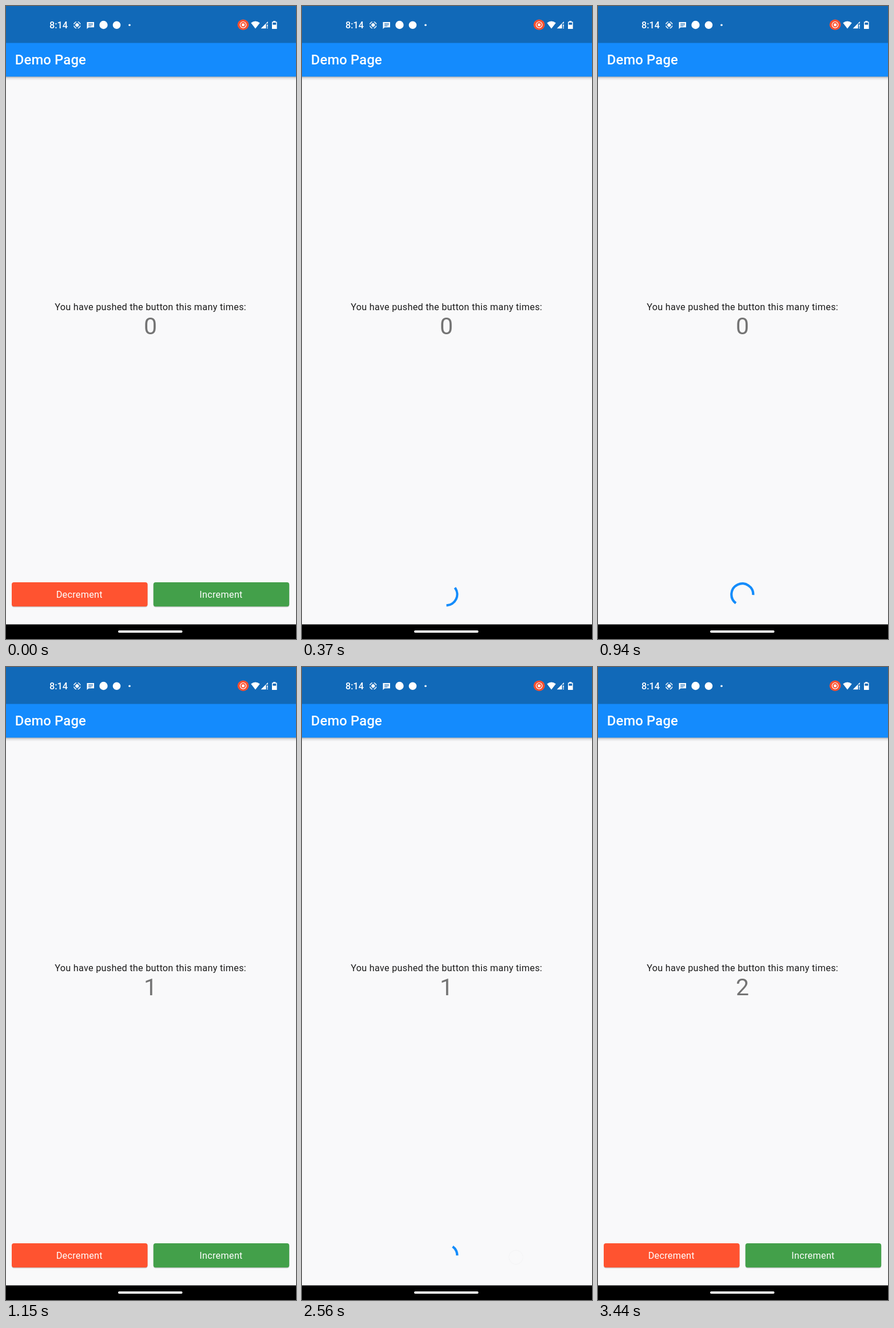
Animation, 507 px wide and 1105 px high, one loop 3480 ms. Source, as an HTML page:

```html
<!DOCTYPE html>
<html lang="en">
<head>
<meta charset="utf-8">
<title>Counter demo</title>
<style>
  html, body { margin: 0; width: 100%; height: 100%; overflow: hidden; background: #f9f9fa; }
  svg { display: block; width: 100%; height: 100%; font-family: Roboto, sans-serif; }
  .body { font-size: 16.25px; letter-spacing: .264px; text-anchor: middle; }
</style>
</head>
<body>
<svg viewBox="0 0 507 1105">
  <defs>
    <linearGradient id="shade" x2="0" y2="1">
      <stop offset="0" stop-color="#000" stop-opacity=".32"/>
      <stop offset=".4" stop-color="#000" stop-opacity=".1"/>
      <stop offset="1" stop-color="#000" stop-opacity="0"/>
    </linearGradient>
    <radialGradient id="touchFill">
      <stop offset="0" stop-color="#fff" stop-opacity=".72"/>
      <stop offset=".78" stop-color="#fff" stop-opacity=".6"/>
      <stop offset=".86" stop-color="#ddd" stop-opacity=".4"/>
      <stop offset=".9" stop-color="#000" stop-opacity=".14"/>
      <stop offset="1" stop-color="#000" stop-opacity="0"/>
    </radialGradient>
  </defs>

  <rect width="507" height="1105" fill="#f9f9fa"/>
  <rect y="123" width="507" height="7" fill="url(#shade)"/>
  <rect width="507" height="65" fill="#1169b8"/>
  <rect y="64.5" width="507" height="58.8" fill="#148bfd"/>
  <text x="15.8" y="101.5" font-size="23.8" font-weight="500" letter-spacing=".16" fill="#fff">Demo Page</text>

  <!-- status bar -->
  <g fill="#fff">
    <text x="76" y="39" font-size="16.2" font-weight="500">8:14</text>
    <circle cx="124.3" cy="33.2" r="3.1"/>
    <circle cx="124.3" cy="33.2" r="5.7" fill="none" stroke="#fff" stroke-width="1.4"
            pathLength="40" stroke-dasharray="7 3" stroke-dashoffset="-1.5"/>
    <path d="M141.5 28H154V37.3H144.5L141.5 40Z"/>
    <path d="M144 30.7H152M144 32.8H152M144 34.9H149.5" stroke="#1169b8" stroke-width="1"/>
    <circle cx="170.5" cy="33" r="7.2"/>
    <circle cx="193.5" cy="33.2" r="6.8"/>
    <circle cx="216" cy="33.3" r="1.8"/>
    <ellipse cx="414.6" cy="32.8" rx="9.9" ry="9.2" fill="#f9502f"/>
    <circle cx="414.6" cy="32.8" r="5.3" fill="none" stroke="#fff" stroke-width="1.2"/>
    <rect x="412.2" y="30.4" width="4.8" height="4.8" rx="1.4"/>
    <path d="M428.3 29.6Q436 23.6 443.8 29.6L436 39.4Z"/>
    <path d="M445.6 39.2L457.8 27V30.6H454.6V39.2Z"/>
    <path d="M456.2 32.3H457.8V36.5H456.2ZM456.2 37.6H457.8V39.2H456.2Z"/>
    <path d="M467.3 26H471.2V27.4H473.6V40H465V27.4H467.3Z"/>
    <rect x="466.4" y="29" width="5.8" height="3.7" fill="#1169b8"/>
  </g>

  <text class="body" x="252.6" y="530.5" fill="#1c1c1c">You have pushed the button this many times:</text>
  <text id="count" x="252.6" y="572.6" font-size="41" text-anchor="middle" fill="#747474">0</text>

  <g id="buttons"></g>
  <path id="spinner" fill="none" stroke="#148cfb" stroke-width="4.2"/>
  <circle id="touch" r="13.5" fill="url(#touchFill)"/>

  <rect y="1079.5" width="507" height="26" fill="#000"/>
  <rect x="196" y="1090" width="112.5" height="4" rx="2" fill="#fff"/>
</svg>
<script>
  const LOOP = 3480, TOUCH_FADE = 200;
  const PRESSES = [
    { x: 372, down: 30, up: 120, load: 145, done: 1110 },
    { x: 374, down: 2290, up: 2385, load: 2405, done: 3370 }
  ];
  const el = id => document.getElementById(id);
  const clamp = v => Math.min(1, Math.max(0, v));

  const button = (x, color, label) => `
    <rect x="${x}" y="1007" width="237.5" height="42.4" rx="4" fill="#000" opacity=".2"/>
    <rect x="${x}" y="1006" width="237.5" height="42.2" rx="4" fill="${color}"/>
    <text class="body" x="${x + 118.3}" y="1033" fill="#fff">${label}</text>`;
  el('buttons').innerHTML =
    button(10, '#ff5330', 'Decrement') + button(257.7, '#43a04a', 'Increment');

  // cubic-bezier(.4, 0, .2, 1), solved by bisection
  function ease(x) {
    let lo = 0, hi = 1;
    for (let i = 0; i < 24; i++) {
      const s = (lo + hi) / 2, r = 1 - s;
      if (1.2 * r * r * s + 0.6 * r * s * s + s * s * s < x) lo = s; else hi = s;
    }
    return lo * lo * (3 - 2 * lo);
  }

  // Material spinner: the head runs ahead, then the tail catches up, while all of it turns.
  function spinnerPath(ms) {
    const phase = ms / 1333 % 1;
    const head = ease(clamp(phase * 2)), tail = ease(clamp(phase * 2 - 1));
    const start = Math.PI * (-0.5 + 1.5 * tail + 2 * ms / 2222 + 0.5 * phase);
    const sweep = Math.max(1.5 * Math.PI * (head - tail), 0.001);
    const point = a => `${252.3 + 19 * Math.cos(a)} ${1027.2 + 19 * Math.sin(a)}`;
    return `M${point(start)}A19 19 0 ${sweep > Math.PI ? 1 : 0} 1 ${point(start + sweep)}`;
  }

  function render(t) {
    const loading = PRESSES.find(p => t >= p.load && t < p.done);
    el('buttons').style.display = loading ? 'none' : '';
    el('spinner').setAttribute('d', loading ? spinnerPath(t - loading.load) : '');
    el('count').textContent = PRESSES.filter(p => t >= p.done).length;

    const press = PRESSES.find(p => t >= p.down && t < p.up + TOUCH_FADE);
    const touch = el('touch');
    touch.style.display = press ? '' : 'none';
    if (press) {
      touch.setAttribute('cx', press.x);
      touch.setAttribute('cy', 1030.3);
      touch.setAttribute('opacity', 1 - clamp((t - press.up) / TOUCH_FADE));
    }
  }

  const begin = performance.now();
  function tick() {
    render((performance.now() - begin) % LOOP);
    requestAnimationFrame(tick);
  }
  tick();
</script>
</body>
</html>
```
